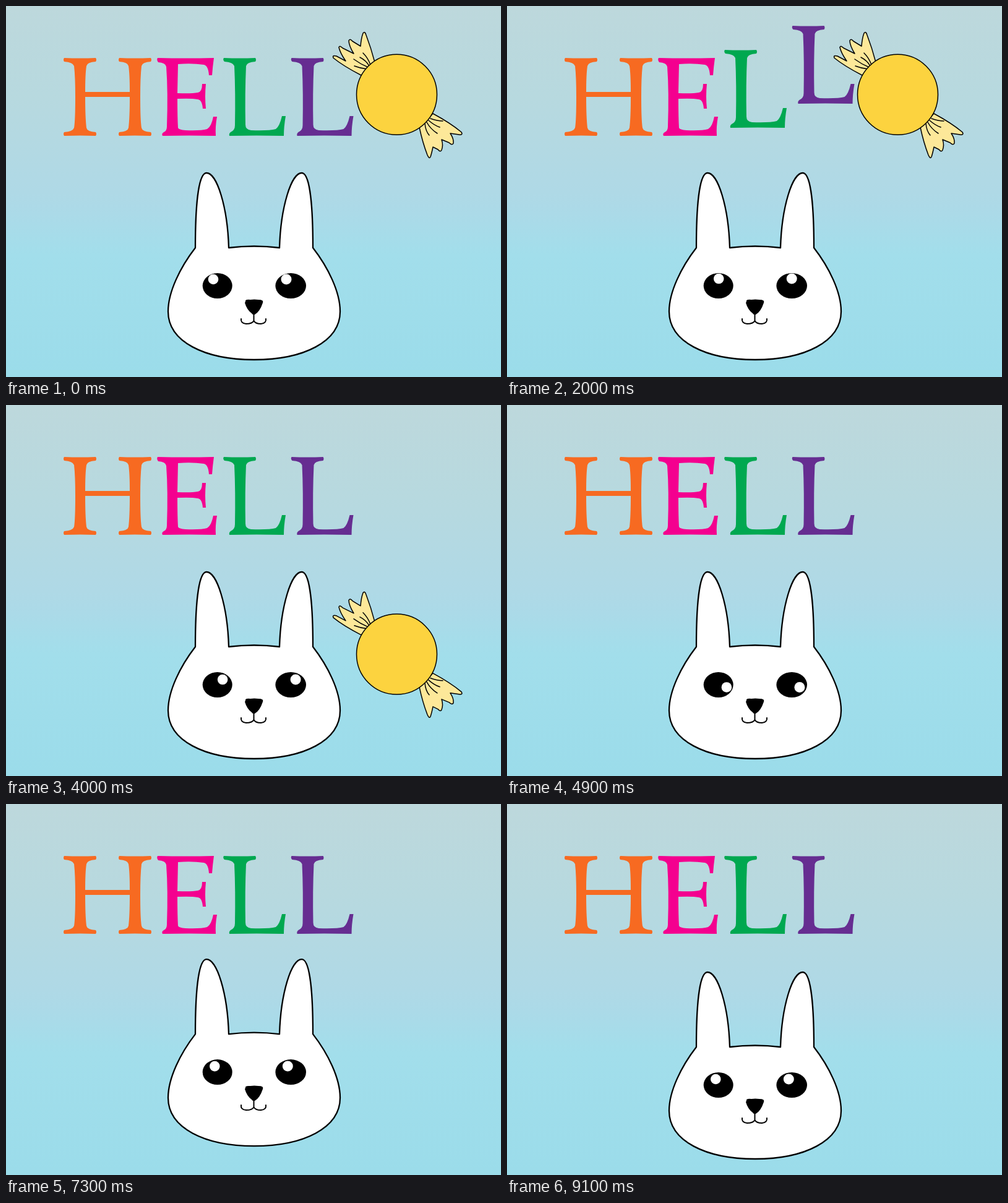
Animation, 800 px wide and 600 px high, one loop 9.7 s. Source, as an HTML page with a canvas:

```html
<!DOCTYPE html>
<html lang="en">
<head>
<meta charset="utf-8">
<title>Hello bunny</title>
<style>
  html, body { margin: 0; width: 100%; height: 100%; overflow: hidden; background: #afd9e6; }
  canvas { display: block; }
</style>
</head>
<body>
<canvas id="stage" width="800" height="600" role="img" aria-label="HELLO"></canvas>
<script>
const ctx = document.getElementById('stage').getContext('2d');
const LOOP = 9700, STEP = 100, LAST = 91;

const sky = ctx.createLinearGradient(0, 0, 0, 600);
[[0, '#bdd8dc'], [0.25, '#b7d9df'], [0.5, '#afd9e6'], [0.56, '#abdae8'],
 [0.67, '#a2deeb'], [1, '#9bdcea']].forEach(([p, c]) => sky.addColorStop(p, c));

const shapeH = new Path2D(`M94 84 Q120 85 145 84 Q147 87 145 90 Q131 91 130 97 Q128 110 128 139
  L200 139 Q200 110 198 97 Q197 91 183 90 Q181 87 183 84 Q208 85 234 84 Q236 87 234 90
  Q220 91 219 97 Q217 115 217 147 Q217 185 219 197 Q220 203 234 204 Q236 207 234 210
  Q208 209 183 210 Q181 207 183 204 Q197 203 198 197 Q200 180 200 147 L128 147
  Q128 180 130 197 Q131 203 145 204 Q147 207 145 210 Q120 209 94 210 Q92 207 94 204
  Q108 203 110 197 Q112 185 112 147 Q112 115 110 97 Q108 91 94 90 Q92 87 94 84Z`);
const shapeE = new Path2D(`M245 84 Q290 85 336 84 Q334 98 333 112 L328 112 Q327 97 320 95
  Q300 92 278 94 L277 141 Q300 142 310 140 Q317 139 317 126 L323 126 Q321 146 323 166
  L318 166 Q317 152 310 151 Q300 149 277 150 Q277 180 278 197 Q279 200 290 201
  Q315 202 325 199 Q332 195 335 179 L341 179 Q338 195 339 210 Q295 209 253 210
  Q251 206 255 204 Q260 202 260 195 Q262 140 259 98 Q258 92 246 91 Q243 87 245 84Z`);
const shapeL = new Path2D(`M352 84 Q378 85 403 84 Q405 87 403 90 Q389 91 388 97 Q386 140 387 192
  Q387 200 396 201 Q425 202 436 199 Q442 195 446 178 L452 178 Q449 195 449 210
  Q405 209 361 210 Q360 206 363 204 Q370 201 370 193 Q371 140 369 97 Q367 91 353 90
  Q350 87 352 84Z`);

const wrapTop = new Path2D(`M574 112 Q545 97 529 84 Q527 79 534 81 L549 89 Q540 76 538 67
  Q539 63 544 68 L562 77 Q554 64 554 56 Q556 52 560 57 L573 65 Q574 52 577 44
  Q580 40 582 47 Q590 68 596 91Z`);
const wrapLow = new Path2D(`M690 174 Q718 189 736 204 Q739 209 732 208 L718 206 Q724 215 723 222
  Q721 226 716 221 L704 216 Q707 225 704 233 Q702 237 698 232 L690 228 Q688 238 686 244
  Q684 248 681 241 Q673 220 668 196Z`);
const creaseTop = new Path2D('M584 102 Q573 101 563 97 M585 99 Q573 94 562 86 M587 97 Q582 88 572 83 M589 95 Q585 84 577 76');
const creaseLow = new Path2D('M677 190 Q678 202 684 209 M680 188 Q686 199 697 206 M683 185 Q692 193 701 196 M686 182 Q697 186 706 186');

const head = new Path2D(`M306 391 C306 330 310 270 324 270 C341 270 358 325 360 391
  Q401 386 442 391 C444 325 461 270 478 270 C492 270 496 330 496 391
  C520 422 540 462 540 494 C540 543 481 572 401 572 C321 572 262 543 262 494
  C262 462 282 422 306 391Z`);
const nose = new Path2D(`M387 478 Q386 474 395 475 Q401 474 408 475 Q417 475 415 480
  Q410 495 402 499 Q399 500 397 497 Q389 491 386 480Z`);
const mouth = new Path2D('M400.5 498 L400.5 510 M380 506 Q379 513 388 514 Q398 514 400.5 509 Q403 514 412 514 Q421 513 420 506');

// Linear path through [step, value] points, held at both ends
function along(keys, k) {
  if (k <= keys[0][0]) return keys[0][1];
  for (let i = 1; i < keys.length; i++) {
    const [a, v] = keys[i - 1], [b, w] = keys[i];
    if (k <= b) return v + (w - v) * (k - a) / (b - a);
  }
  return keys[keys.length - 1][1];
}

const hop = (k, start, rise) => along([[start, 0], [start + 5, -rise], [start + 10, 0]], k);

const eyeX = [[1, 335], [21, 342.6], [31, 346.4], [41, 350.5], [51, 356], [61, 337.3]];
const eyeY = [[1, 442], [21, 441], [31, 442], [41, 444.3], [51, 459.5], [61, 443]];
const hopH = [[1, 0], [6, -67], [11, -2], [12, 0]];
const bunnyY = [[61, 0], [66, -50], [71, 1.5], [76, -49.5], [81, 2], [86, -49.5], [91, 2]];

function at(x, y, draw) {
  ctx.save();
  ctx.translate(x, y);
  draw();
  ctx.restore();
}

function letter(shape, color, x, y) {
  at(x, y, () => {
    ctx.fillStyle = color;
    ctx.fill(shape);
  });
}

function oval(x, y, rx, ry, color) {
  ctx.beginPath();
  ctx.ellipse(x, y, rx, ry, 0, 0, Math.PI * 2);
  ctx.fillStyle = color;
  ctx.fill();
}

function drawWrapper(shape, creases) {
  ctx.fillStyle = '#fde899';
  ctx.fill(shape);
  ctx.stroke(shape);
  ctx.stroke(creases);
}

function drawCandy() {
  ctx.lineWidth = 1.5;
  drawWrapper(wrapTop, creaseTop);
  drawWrapper(wrapLow, creaseLow);
  oval(631.5, 143.3, 65, 65, '#fcd33f');
  ctx.stroke();
}

function drawBunny(k) {
  ctx.lineWidth = 2.3;
  ctx.fillStyle = '#fff';
  ctx.fill(head);
  ctx.stroke(head);
  oval(341.7, 452.5, 24, 20.5, '#000');
  oval(460.2, 452.5, 24.8, 20.5, '#000');
  const x = along(eyeX, k), y = along(eyeY, k);
  oval(x, y, 8.3, 8.3, '#fff');
  oval(x + 118, y, 8.5, 8.5, '#fff');
  ctx.fillStyle = '#000';
  ctx.fill(nose);
  ctx.lineWidth = 2;
  ctx.stroke(mouth);
}

function candyY(k) {
  const n = k - 31;
  return n <= 0 ? hop(k, 21, 40) : 25.8 * n + 0.341 * n * n;
}

function render(ms) {
  const k = Math.min(LAST, Math.floor(ms / STEP));
  ctx.fillStyle = sky;
  ctx.fillRect(0, 0, 800, 600);
  ctx.strokeStyle = '#000';
  ctx.lineCap = ctx.lineJoin = 'round';
  letter(shapeH, '#f76a21', 0, along(hopH, k));
  letter(shapeE, '#f4008f', 0, hop(k, 6, 65));
  letter(shapeL, '#00a850', 0, hop(k, 11, 65));
  letter(shapeL, '#662d91', 109.5, hop(k, 16, 65));
  at(0, candyY(k), drawCandy);
  at(0, along(bunnyY, k), () => drawBunny(k));
}

const start = performance.now();
function tick() {
  render((performance.now() - start) % LOOP);
  requestAnimationFrame(tick);
}
tick();
</script>
</body>
</html>
```
